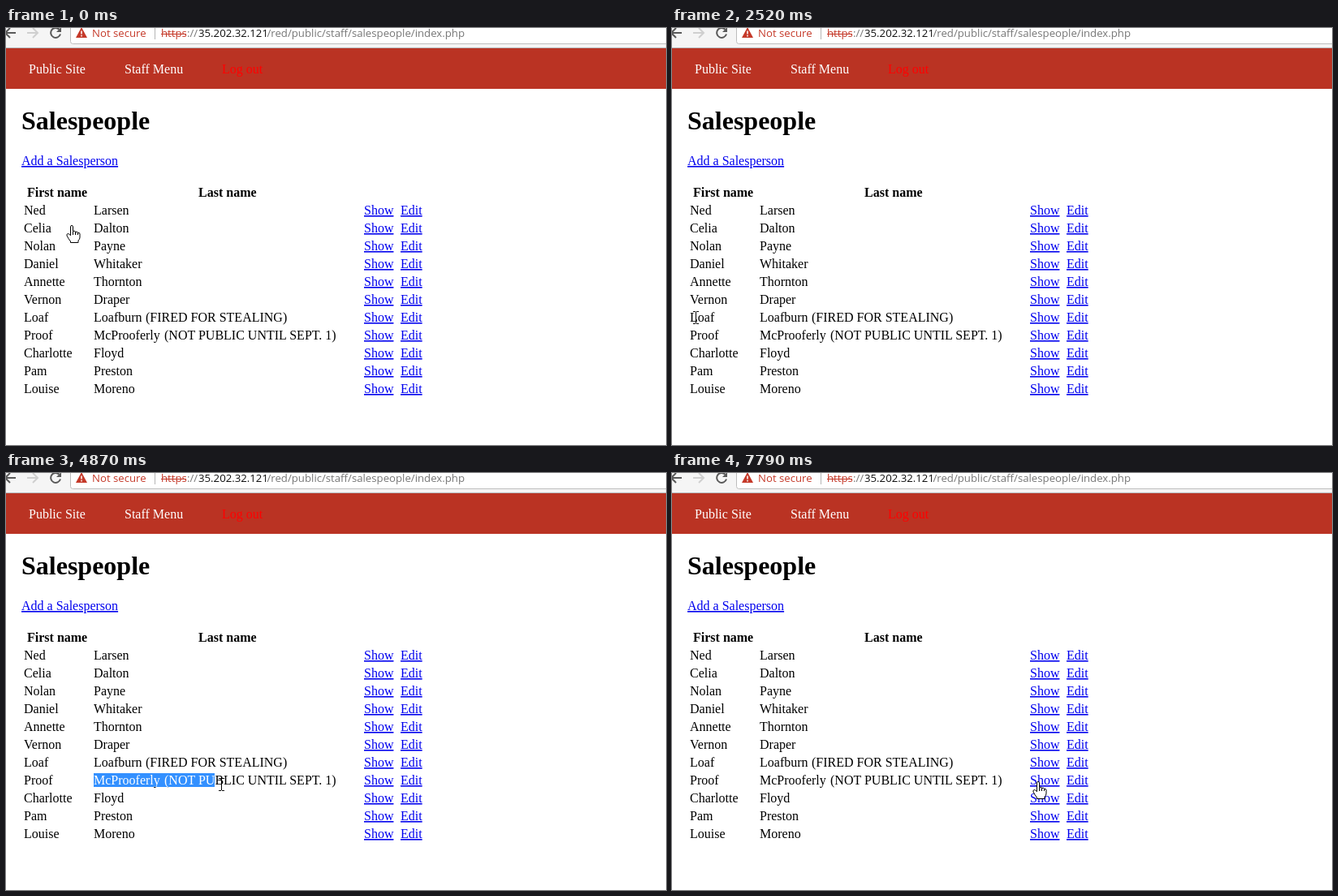
Animation of 813 by 514 pixels, one loop 8000 ms. Source, as an HTML page:

```html
<!DOCTYPE html>
<html lang="en">
<head>
<meta charset="utf-8">
<title>Salespeople</title>
<style>
  html, body { margin: 0; width: 100%; height: 100%; overflow: hidden; background: #fff; }
  svg { display: block; font: 16px "Liberation Serif", "Times New Roman", serif; }
  text { white-space: pre; }
  .bar { font: 13.2px "Open Sans", "Noto Sans", sans-serif; }
  .bold { font-weight: bold; }
  .link { fill: #00e; text-decoration: underline 1px; text-underline-offset: 1px; text-decoration-skip-ink: none; }
  .icon { fill: none; stroke: #5a5a5a; stroke-width: 2; }
  .cursor > * { display: none; fill: #fff; stroke: #000; }
  .cursor > .on { display: inline; }
</style>
</head>
<body>
<svg width="813" height="514" viewBox="0 0 813 514">
  <defs><clipPath id="picked"><rect id="pick" x="108" y="370" width="0" height="17"/></clipPath></defs>

  <g class="bar">
    <rect width="813" height="25" fill="#f5f5f5"/>
    <path d="M0 24.5H813" stroke="#b6b4b6"/>
    <rect x="79.5" y="-10" width="760" height="29.5" rx="3" fill="#fff" stroke="#bdbdbd"/>
    <path class="icon" d="M12 6H-1M5 0L-1 6L5 12"/>
    <path class="icon" d="M26 6H39M33 0L39 6L33 12" style="stroke:#cfcfcf"/>
    <path class="icon" d="M65.5 1.7A6 6 0 1 0 67 7.5"/>
    <path d="M68 -1V5H62Z" fill="#5a5a5a"/>
    <path d="M93 -1L100 12H86Z" fill="#c53929"/>
    <path d="M93 3.5V7.5M93 8.8V10.4" stroke="#fff" stroke-width="1.5"/>
    <text x="106" y="11" fill="#c53929">Not secure</text>
    <path d="M183.5 0V14" stroke="#b5b5b5"/>
    <text x="191" y="11" fill="#c53929">https</text>
    <path d="M191 7.5H222" stroke="#c53929"/>
    <text x="223" y="11" fill="#777">://</text>
    <text x="237" y="11" fill="#111">35.202.32.121</text>
    <text x="321.5" y="11" fill="#777">/red/public/staff/salespeople/index.php</text>
  </g>

  <rect y="25" width="813" height="50" fill="#ba3323"/>
  <text x="28" y="56" fill="#fff">Public Site</text>
  <text x="146" y="56" fill="#fff">Staff Menu</text>
  <text x="266" y="56" fill="#f00">Log out</text>

  <text class="bold" x="19" y="125" font-size="32">Salespeople</text>
  <text class="link" x="19" y="169">Add a Salesperson</text>
  <text class="bold" x="26" y="208">First name</text>
  <text class="bold" x="237" y="208">Last name</text>
  <g id="rows"></g>

  <g id="selection" clip-path="url(#picked)" fill="#fff">
    <rect x="108" y="370" width="300" height="17" fill="#3390ff"/>
  </g>

  <g id="cursor" class="cursor">
    <path id="arrow" d="M.5 .5V16.5L4.3 12.9L6.8 18.5L9.2 17.5L6.8 12H11.5Z"/>
    <path id="beam" d="M-3 -7.5H0M1 -7.5H4M.5 -7V7M-3 7.5H0M1 7.5H4"/>
    <path id="hand" d="M-1.5 12V1.8Q-1.5 .5 0 .5T1.5 1.8V7.5Q4.5 6.3 4.5 8.5Q7.3 7.3 7.5 9.5Q10 8.8 10 11V15Q10 17.5 8 19V21.5H-1.5V20Q-4 17 -6 13Q-6.5 10.5 -4.5 10.5Q-3 10.8 -1.5 12.8ZM1.5 8V12M4.5 8.5V12M7.5 9.5V12"/>
  </g>
</svg>
<script>
const LOOP = 8000;
const $ = id => document.getElementById(id);

// first name, last name, optional note and its x
const people = [
  ["Ned", "Larsen"], ["Celia", "Dalton"], ["Nolan", "Payne"], ["Daniel", "Whitaker"],
  ["Annette", "Thornton"], ["Vernon", "Draper"],
  ["Loaf", "Loafburn", "(FIRED FOR STEALING)", 172],
  ["Proof", "McProoferly", "(NOT PUBLIC UNTIL SEPT. 1)", 195],
  ["Charlotte", "Floyd"], ["Pam", "Preston"], ["Louise", "Moreno"]
];

function addText(parent, x, y, string, cls) {
  const el = document.createElementNS("http://www.w3.org/2000/svg", "text");
  el.setAttribute("x", x);
  el.setAttribute("y", y);
  if (cls) el.setAttribute("class", cls);
  el.textContent = string;
  parent.append(el);
}

function addLastName(parent, y, [, last, note, noteX]) {
  addText(parent, 108, y, last);
  if (note) addText(parent, noteX, y, note);
}

people.forEach((person, i) => {
  const y = 230 + i * 22;
  addText($("rows"), 22, y, person[0]);
  addLastName($("rows"), y, person);
  addText($("rows"), 441, y, "Show", "link");
  addText($("rows"), 486, y, "Edit", "link");
});
addLastName($("selection"), 384, people[7]);

// time, steps since the previous key, hot spot x and y, pointer shape
const keys = [
  [0, 1, 81, 243, "hand"],
  [120, 1, 100, 250, "arrow"],
  [260, 1, 135, 258, "beam"],
  [700, 3, 236, 294, "arrow"],
  [1110, 3, 244, 302, "arrow"],
  [1260, 1, 247, 309, "arrow"],
  [1670, 3, 256, 329, "arrow"],
  [1960, 2, 135, 352, "beam"],
  [2240, 2, 56, 348, "arrow"],
  [2510, 2, 29, 357, "beam"],
  [2790, 2, 75, 368, "arrow"],
  [3350, 4, 306, 349, "beam"],
  [3630, 2, 336, 355, "beam"],
  [4040, 3, 170, 388, "arrow"],
  [4440, 3, 111, 380, "beam"],
  [4870, 3, 265, 384, "beam"],
  [5280, 3, 405, 384, "beam"],
  [5420, 1, 410, 379, "arrow"],
  [6410, 1, 395, 379, "beam"],
  [6690, 2, 350, 375, "beam"],
  [6820, 1, 352, 376, "beam"],
  [7100, 2, 409, 382, "arrow"],
  [7380, 2, 416, 380, "arrow"],
  [7520, 1, 426, 381, "arrow"],
  [7660, 1, 448, 382, "hand"],
  [7790, 1, 451, 380, "hand"]
];

const poses = keys.flatMap(([time, steps, x, y, shape], i) => {
  const [t0, , x0, y0] = keys[Math.max(0, i - 1)];
  return Array.from({ length: steps }, (_, n) => {
    const k = (n + 1) / steps;
    const mix = (a, b) => a + (b - a) * k;
    return {
      time: Math.round(mix(t0, time) / 10) * 10,
      x: Math.round(mix(x0, x)),
      y: Math.round(mix(y0, y)),
      shape
    };
  });
});

function selectionEnd(pose, t) {
  if (t < 4590 || t >= 5950) return 108;
  return pose.time >= 5280 ? 407 : pose.x - 8;
}

const start = performance.now();

function draw() {
  const t = (performance.now() - start) % LOOP;
  const pose = poses.findLast(p => p.time <= t) || poses[0];
  $("cursor").setAttribute("transform", `translate(${pose.x} ${pose.y})`);
  for (const el of $("cursor").children) el.classList.toggle("on", el.id === pose.shape);
  $("pick").setAttribute("width", selectionEnd(pose, t) - 108);
  requestAnimationFrame(draw);
}
draw();
</script>
</body>
</html>
```
